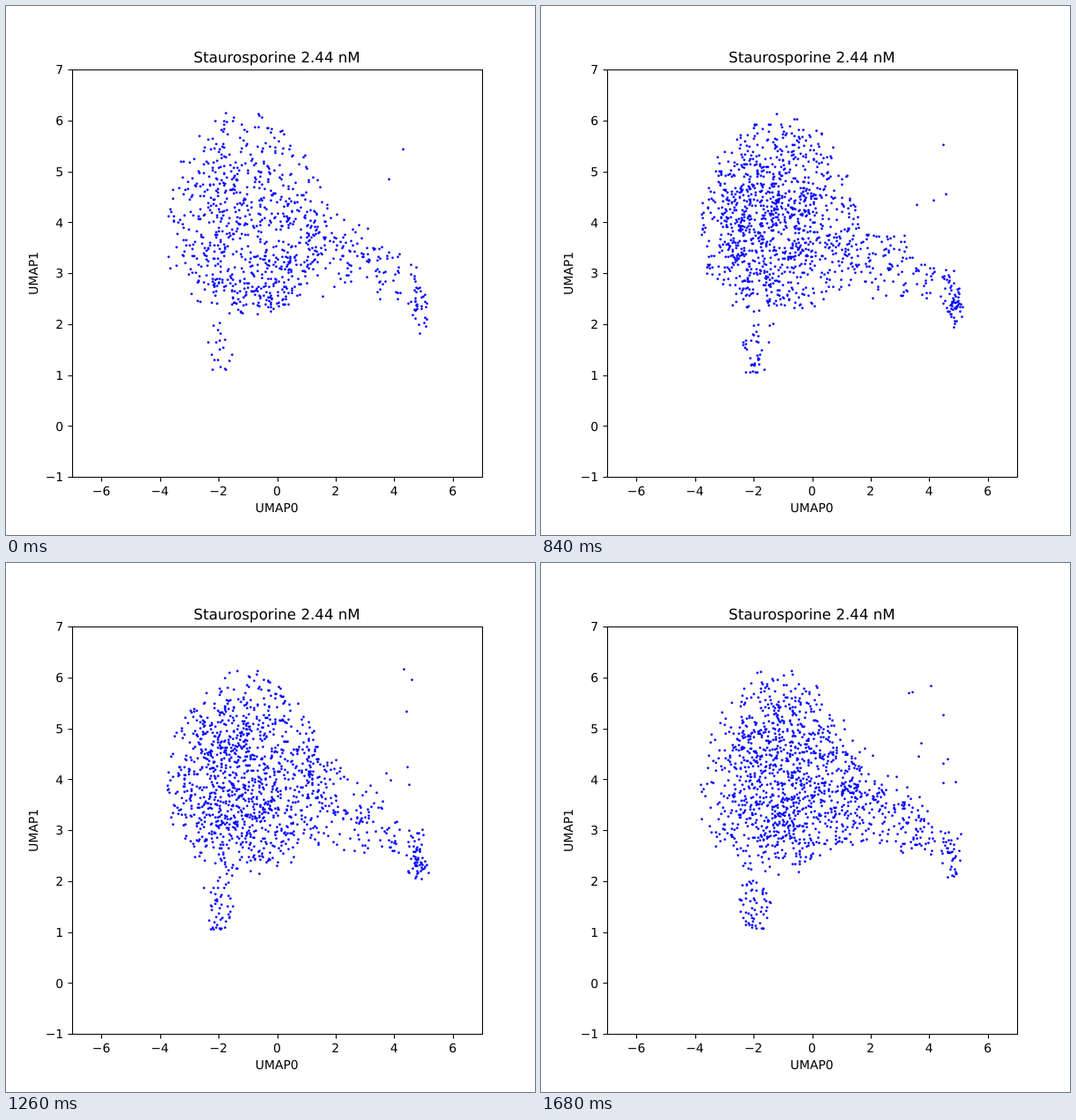
An HTML page that plays this animation: 600 px wide and 600 px high, repeating every 1.82 s.

```html
<!DOCTYPE html>
<html lang="en">
<head>
<meta charset="utf-8">
<title>UMAP scatter</title>
<style>
  html, body { margin: 0; width: 100%; height: 100%; overflow: hidden; background: #fff; }
  svg { display: block; width: 600px; height: 600px; }
  text { font: 13.89px "DejaVu Sans", sans-serif; text-anchor: middle; text-rendering: geometricPrecision; }
  .title { font-size: 16.67px; }
  .end { text-anchor: end; }
  #axes { fill: none; stroke: #000; stroke-width: 1.11; }
  #dots { fill: none; stroke: #00f; stroke-width: 2.75; stroke-linecap: round; }
</style>
</head>
<body>
<svg viewBox="0 0 600 600">
  <path id="dots"/>
  <path id="axes"/>
  <g id="labels">
    <text class="title" x="307.3" y="64">Staurosporine 2.44 nM</text>
    <text x="307.2" y="574">UMAP0</text>
    <text transform="translate(36 303.3) rotate(-90)">UMAP1</text>
  </g>
</svg>
<script>
const FRAMES = 13, STEP = 140;
const $ = id => document.getElementById(id);
const px = u => 307.5 + u * 465 / 14;
const py = v => 476.25 - v * 57.75;
const snap = n => Math.floor(n + 0.5) + 0.5;

function seeded(seed) {
  return () => {
    seed = (seed + 0x6D2B79F5) | 0;
    let t = Math.imul(seed ^ (seed >>> 15), 1 | seed);
    t = (t + Math.imul(t ^ (t >>> 7), 61 | t)) ^ t;
    return ((t ^ (t >>> 14)) >>> 0) / 4294967296;
  };
}

// A fresh sample of cells for each step; t runs from 0 to 1 over the loop
function cloud(frame) {
  const t = frame / (FRAMES - 1);
  const start = Math.max(0, 1 - 6 * t);
  const rand = seeded(frame * 977 + 5);
  const spread = () => (rand() + rand() + rand() - 1.5) * 2;
  const points = [];
  const add = (count, make) => {
    for (let i = 0; i < count; i++) points.push(make());
  };

  // Egg-shaped body, partly drawn towards a drifting focus, hollow at the start
  const focusX = -0.6 - 1.7 * Math.sin(Math.PI * t);
  const focusY = 3.8 - start;
  add(1060 - 330 * start, () => {
    const angle = Math.PI * rand(), r = rand() ** (0.5 - 0.12 * start);
    const height = rand() < 0.63 ? 2.65 : -1.5;
    const x = -1.1 + 2.8 * r * Math.cos(angle);
    const y = 3.6 + height * r * Math.sin(angle);
    const pull = 0.55 * rand() ** 2;
    return [x + (focusX - x) * pull, y + (focusY - y) * pull];
  });

  // Arm to the right and the cluster at its end
  add(100 + 110 * t * t + 40 * start, () => {
    const x = 1 + 3.2 * rand() ** 1.2;
    const low = 2.55 - 0.05 * x, high = 5.6 - 0.5 * x;
    return [x, low + (high - low) * (rand() + rand()) / 2];
  });
  add(40 + 28 * Math.sin(Math.PI * t), () => {
    const x = 5.22 - 0.45 * (rand() + rand());
    return [x, 2.5 - 0.4 * (x - 4.8) + 0.27 * spread()];
  });

  // Tail below, densest at its tip
  add(20 + 38 * t, () => {
    const k = rand() ** 0.6;
    return [-1.95 + (rand() - rand()) * (0.85 - 0.45 * k), 2.2 - 1.15 * k];
  });

  // Strays at the upper right
  add(2 + 8 * t * t, () => [3.3 + 1.6 * rand(), 3.8 + 2.5 * rand() ** 1.5]);

  return points.map(([x, y]) => `M${snap(px(x))} ${snap(py(y))}h0`).join("");
}

function label(x, y, n, cls) {
  const text = document.createElementNS("http://www.w3.org/2000/svg", "text");
  text.setAttribute("x", x);
  text.setAttribute("y", y);
  text.setAttribute("class", cls);
  text.textContent = String(n).replace("-", "\u2212");
  $("labels").append(text);
}

let axes = "M75.5 72.5H540.5V534.5H75.5Z";
for (let n = -6; n <= 6; n += 2) {
  axes += `M${snap(px(n))} 534.5v5`;
  label(px(n) - 0.2, 555, n, "");
}
for (let n = -1; n <= 7; n++) {
  axes += `M75.5 ${snap(py(n))}h-5`;
  label(65.1, Math.round(py(n) + 5.3), n, "end");
}
$("axes").setAttribute("d", axes);

const clouds = Array.from({ length: FRAMES }, (_, i) => cloud(i));
let shown = -1;
function draw() {
  const frame = Math.floor(performance.now() / STEP) % FRAMES;
  if (frame !== shown) $("dots").setAttribute("d", clouds[shown = frame]);
  requestAnimationFrame(draw);
}
draw();
</script>
</body>
</html>
```
